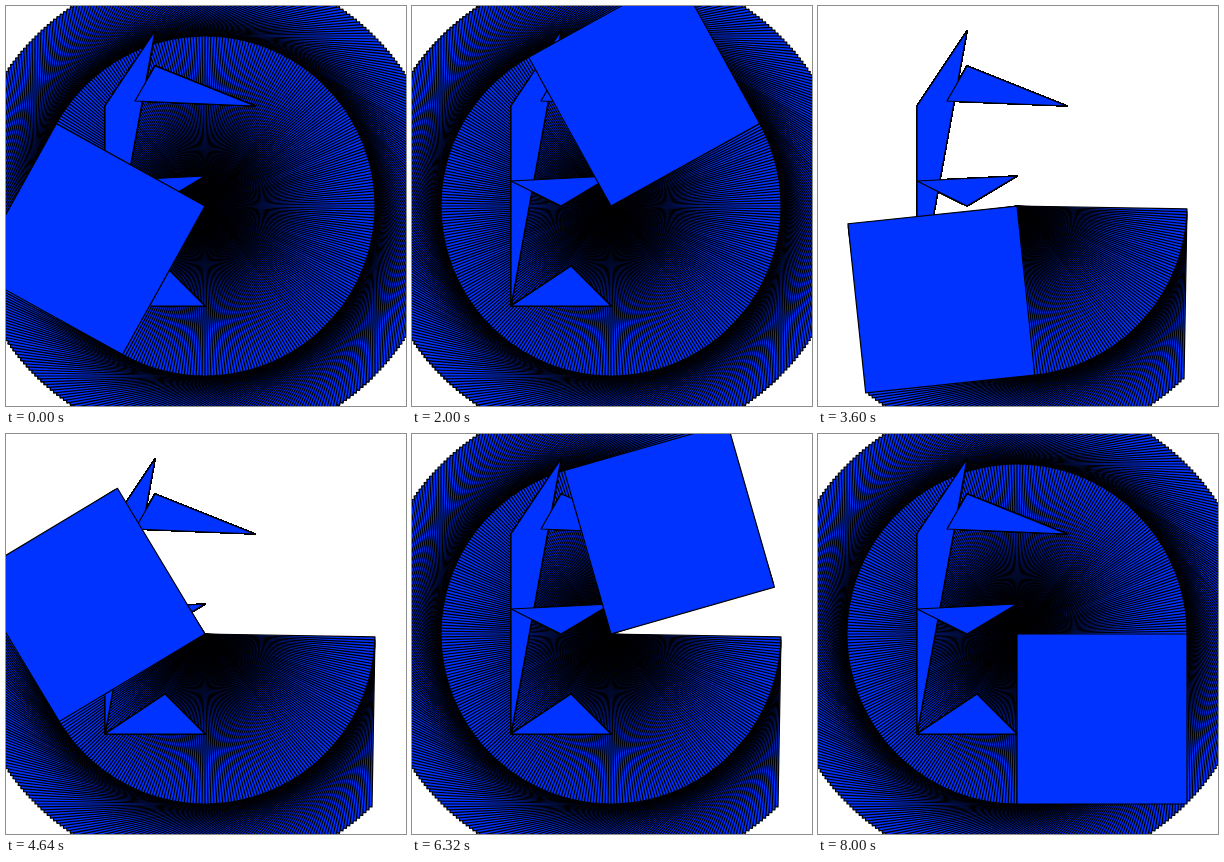
Animation, 400 px wide and 400 px high, one loop 8080 ms. Source, as an HTML page with a canvas:

```html
<!DOCTYPE html>
<html lang="en">
<head>
<meta charset="utf-8">
<title>Rotating square</title>
<style>
html, body { margin: 0; width: 100%; height: 100%; overflow: hidden; background: #fff; }
canvas { display: block; }
</style>
</head>
<body>
<canvas id="stage" width="400" height="400"></canvas>
<script>
const SIZE = 400, TICK = 80, TICKS = 101;
const RESTART = 27;              // tick at which the drawing is wiped
const LATE_START = 360 + 119;    // steps already drawn when the loop begins
const STEP = Math.PI / 180;
const SIDE = 170;
const TRIANGLES = [
  [[100, 100], [150, 25], [100, 300]],
  [[150, 60], [250, 100], [130, 95]],
  [[100, 175], [200, 170], [150, 200]],
  [[100, 300], [160, 260], [200, 300]]
];

function prepare(canvas) {
  const ctx = canvas.getContext('2d');
  ctx.fillStyle = '#0033ff';
  ctx.strokeStyle = '#000';
  ctx.lineWidth = 1.2;
  ctx.lineJoin = 'round';
  return ctx;
}

function polygon(ctx, points) {
  ctx.beginPath();
  for (const [x, y] of points) ctx.lineTo(x, y);
  ctx.closePath();
  ctx.fill();
  ctx.stroke();
}

// Every step paints over the previous ones without clearing.
function paintStep(ctx, n) {
  ctx.setTransform(1, 0, 0, 1, -1, 0);
  for (const points of TRIANGLES) polygon(ctx, points);
  ctx.translate(200, 200);
  ctx.rotate(n * STEP);
  polygon(ctx, [[0, 0], [SIDE, 0], [SIDE, SIDE], [0, SIDE]]);
  ctx.setTransform(1, 0, 0, 1, 0, 0);
}

function wipe(ctx) {
  ctx.save();
  ctx.fillStyle = '#fff';
  ctx.fillRect(0, 0, SIZE, SIZE);
  ctx.restore();
}

const stage = prepare(document.getElementById('stage'));
const layered = document.createElement('canvas');
layered.width = layered.height = SIZE;
const layeredCtx = prepare(layered);
wipe(layeredCtx);
for (let n = 1; n <= LATE_START; n++) paintStep(layeredCtx, n);

function stepsAt(tick) {
  if (tick < RESTART) return Math.floor(LATE_START + 4.9 * tick);
  return Math.max(0, Math.floor(14 + 5.02 * (tick - 31)));
}

let painted = -1, wasLate = null;

function render(ms) {
  const tick = Math.floor(ms / TICK) % TICKS;
  const late = tick < RESTART;
  const steps = stepsAt(tick);
  if (late !== wasLate || steps < painted) {
    if (late) stage.drawImage(layered, 0, 0);
    else wipe(stage);
    painted = late ? LATE_START : 0;
    wasLate = late;
  }
  while (painted < steps) paintStep(stage, ++painted);
}

const start = performance.now();
function loop() {
  render(performance.now() - start);
  requestAnimationFrame(loop);
}
loop();
</script>
</body>
</html>
```
